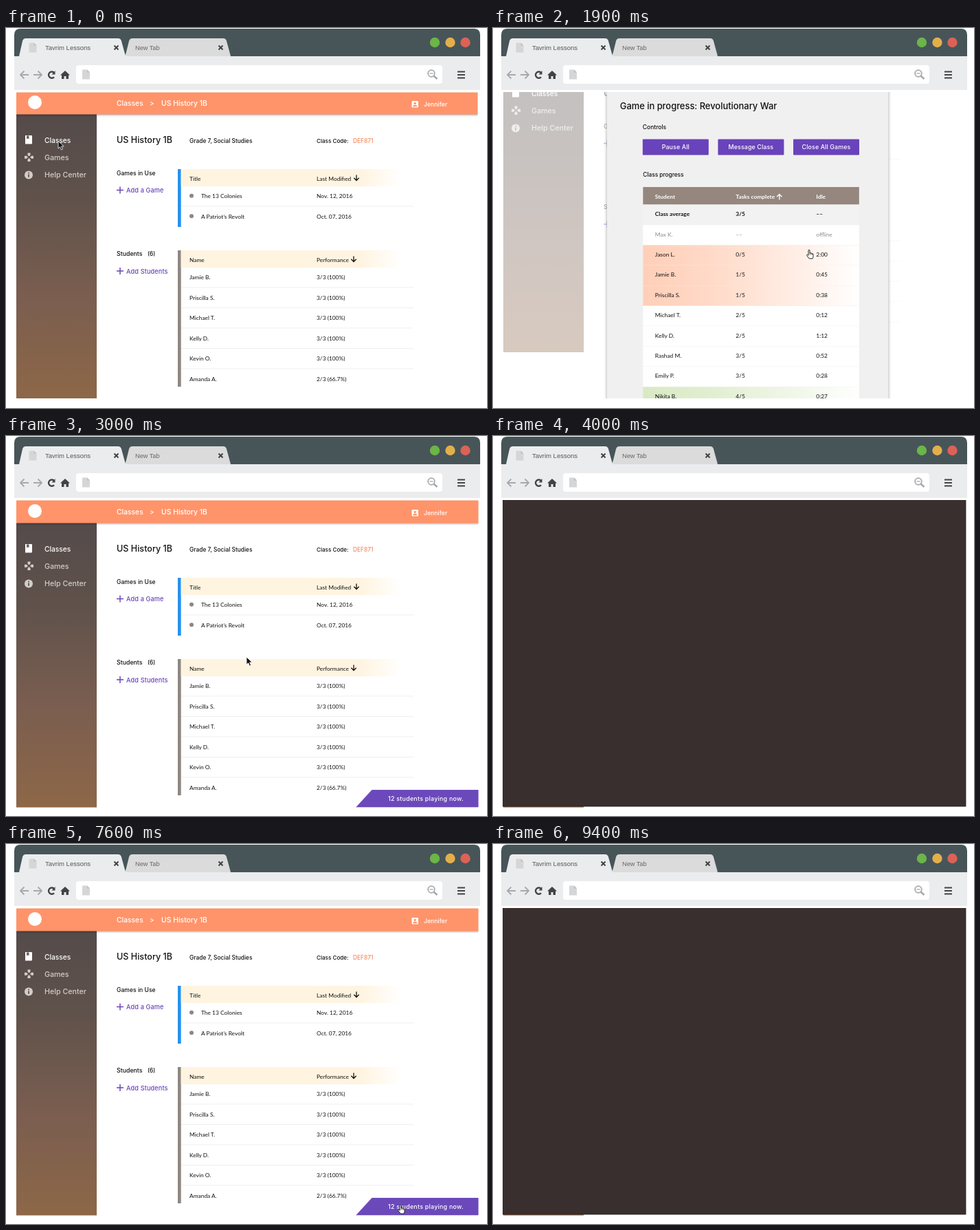
An HTML page that plays this animation: 700 by 552 pixels, repeating every 9.6 s.

```html
<!DOCTYPE html>
<html lang="en">
<head>
<meta charset="utf-8">
<title>Class dashboard</title>
<style>
  html, body { margin: 0; width: 100%; height: 100%; overflow: hidden; background: #fff; }
  svg { display: block; width: 700px; height: 552px; }
  text { white-space: pre; }
  .ui { font-family: Inter, sans-serif; font-weight: 500; }
  .cell { font-family: Lato, sans-serif; }
  .body { font-family: Roboto, sans-serif; }
  .tab { font-family: "Liberation Sans", Arial, sans-serif; }
  .shadow { filter: drop-shadow(0 2px 4px rgba(0, 0, 0, .4)); }
</style>
</head>
<body>
<svg id="stage" viewBox="0 0 700 552"></svg>
<script>
const PURPLE = '#6a45b8', INK = '#111', TAUPE = '#8f8681', ORANGE = '#ff946a';

// Markup helpers. Text is placed by the vertical centre of its capitals.
const text = (x, cy, str, size, o = {}) =>
  `<text class="${o.cls || 'ui'}" x="${x}" y="${cy + size * .36}" font-size="${size}" fill="${o.fill || INK}"` +
  ` font-weight="${o.weight || ''}" text-anchor="${o.anchor || 'start'}" letter-spacing="${o.gap || 0}">${str}</text>`;
const cell = (x, cy, str, o = {}) => text(x, cy, str, 8.4, { cls: 'cell', ...o });
const rect = (x, y, w, h, fill, extra = '') =>
  `<rect x="${x}" y="${y}" width="${w}" height="${h}" fill="${fill}" ${extra}/>`;
const path = (d, fill, extra = '') => `<path d="${d}" fill="${fill}" ${extra}/>`;
const line = (d, color, w, extra = '') => path(d, 'none', `stroke="${color}" stroke-width="${w}" ${extra}`);
const disc = (x, y, r, fill) => `<circle cx="${x}" cy="${y}" r="${r}" fill="${fill}"/>`;
const group = (id, inner, extra = '') => `<g id="${id}" ${extra}>${inner}</g>`;
const gradient = (id, stops, vertical) =>
  `<linearGradient id="${id}" x2="${vertical ? 0 : 1}" y2="${vertical ? 1 : 0}">` +
  stops.map(([at, color, a = 1]) => `<stop offset="${at}" stop-color="${color}" stop-opacity="${a}"/>`).join('') +
  '</linearGradient>';

const cross = (x, y, r, color, w) =>
  line(`M${x - r} ${y - r}l${2 * r} ${2 * r}m0 ${-2 * r}l${-2 * r} ${2 * r}`, color, w);
const plus = (x, y) => line(`M${x - 5} ${y}h10M${x} ${y - 5}v10`, PURPLE, 1.5);
const sortArrow = (x, y, dir, color) =>
  line(`M${x} ${y - 4 * dir}v${8 * dir}m-3.7 ${-3.7 * dir}l3.7 ${3.7 * dir}l3.7 ${-3.7 * dir}`, color, 1.3);
const sheet = (x, y) =>
  path(`M${x} ${y}h7l4 4v10h-11z`, '#d6d6d7') + path(`M${x + 7} ${y}v4h4z`, '#bfbfc1');

const defs = '<defs>' +
  gradient('side', [[0, '#544b4a'], [.3, '#60524b'], [.65, '#7b5e50'], [1, '#8d6747']], true) +
  gradient('cream', [[0, '#fff4e0'], [.82, '#fff4e0'], [1, '#fff4e0', 0]]) +
  gradient('late', [[0, '#ffcfb8'], [.3, '#ffd9c7'], [.75, '#fff0e8'], [1, '#fff']]) +
  gradient('ahead', [[0, '#d9e9c4'], [.3, '#e1eed0'], [.75, '#f3f8ec'], [1, '#fff']]) +
  '<clipPath id="view"><rect id="viewBox" x="15" y="93.5"/></clipPath></defs>';

function browser() {
  const dark = '#434244', grey = '#a9a9ab';
  return path('M12 41V10q0-9 9-9h660q9 0 9 9v31z', '#475559') +
    rect(12, 41, 678, 49, '#ebecee') +
    path('M171 41q3-1 4-6l4-16q1-4 5-4h132q4 0 5 4l6 22z', '#dbdbdb') +
    path('M19 41l5-22q1-4 5-4h134q4 0 5 4l6 22z', '#ebecee') +
    sheet(33.5, 21.5) + sheet(111, 60.5).replace('', '') +
    text(57, 28.5, 'Tavrim Lessons', 9.5, { cls: 'tab', fill: '#555' }) +
    text(188, 28.5, 'New Tab', 9.2, { cls: 'tab', fill: '#666' }) +
    cross(160.5, 28.5, 3, '#3f4446', 2) + cross(312.5, 28.5, 3, '#3f4446', 2) +
    disc(624, 21, 7.2, '#6cb548') + disc(646.5, 21, 7.2, '#e3af4c') + disc(668.5, 21, 7.2, '#dc6257') +
    line('M33 68H21m5.5-5.5L21 68l5.5 5.5M40 68h12m-5.5-5.5L52 68l-5.500 5.500', grey, 1.8) +
    line('M70 65a4.600 4.600 0 1 0 0 6.200', dark, 2.4) + path('M71.500 62v5.500h-5z', dark) +
    path('M79 68.500l7-6.500 7 6.500h-2v5.500h-3.500v-4h-3v4H81v-5.500z', dark) +
    rect(102, 54, 533, 27, '#fff', 'rx="4"') + sheet(111, 60.5) +
    `<circle cx="619" cy="66" r="4.800" fill="none" stroke="${grey}" stroke-width="1.800"/>` +
    line('M616.500 66h5', grey, 1.3) + line('M622.500 69.500l5 4.500', grey, 2.8) +
    line('M657 63.500h11m-11 4.500h11m-11 4.500h11', dark, 2.2);
}

function frame() {
  const pale = '#d3cdca';
  return rect(15, 126, 117, 414, 'url(#side)') +
    rect(15, 93, 673, 33.5, ORANGE, 'style="filter:drop-shadow(0 1px 1.5px rgba(0,0,0,.35))"') +
    disc(42, 109, 10, '#fff') +
    text(161, 110.5, 'Classes', 10.3, { fill: '#fff' }) +
    text(209, 110.5, '&gt;', 10, { fill: '#fff' }) +
    text(226, 110.5, 'US History 1B', 10.4, { fill: '#fff' }) +
    rect(590.5, 107, 9.5, 9.5, '#fff', 'rx="1"') + disc(595.2, 110.4, 1.7, ORANGE) +
    path('M592 115.300q0-2.600 3.200-2.600t3.200 2.600z', ORANGE) +
    text(608, 112.3, 'Jennifer', 8.7, { fill: '#fff' }) +
    path('M28 157h9q1 0 1 1v10.500q0 1-1 1h-9z', '#fff') + path('M30 157.500h3.500v5l-1.750-1.300-1.750 1.300z', '#6b605d') +
    text(56, 164, 'Classes', 10.2, { fill: '#fff' }) +
    path('M31.500 182.500h4v3l-2 2-2-2zM31.500 195h4v-3l-2-2-2 2zM27 186.800v4h3l2-2-2-2zM40 186.800v4h-3l-2-2 2-2z', pale) +
    text(56, 189.3, 'Games', 10.7, { fill: pale }) +
    disc(33, 214.5, 6, pale) + rect(32.2, 213.5, 1.7, 4.3, '#584e4b') + rect(32.2, 210.7, 1.7, 1.7, '#584e4b') +
    text(56, 214.5, 'Help Center', 10.7, { fill: pale });
}

function table(y, h, bar, heads, rows) {
  let out = rect(250, y, 4.7, h, bar) + rect(254.7, y, 320, 25, 'url(#cream)') +
    cell(267, y + 13.5, heads[0]) + cell(452, y + 13.5, heads[1]) + sortArrow(heads[2], y + 12.5, 1, INK);
  rows.forEach(([name, value, indent = 0], i) => {
    const cy = y + 39 + i * 29.5;
    if (indent) out += disc(270, cy - .3, 3, TAUPE);
    out += cell(267 + indent, cy, name) + cell(452, cy, value);
    if (i < rows.length - 1) out += rect(255, cy + 14.5, 338, .8, '#ececec');
  });
  return out;
}

function content() {
  const link = { fill: PURPLE, gap: .1 };
  const pupils = ['Jamie B.', 'Priscilla S.', 'Michael T.', 'Kelly D.', 'Kevin O.', 'Amanda A.'];
  return text(161, 163.7, 'US History 1B', 12.6) +
    text(267, 164.7, 'Grade 7, Social Studies', 8.4) +
    text(452, 165, 'Class Code:', 8.1) +
    text(505, 165, 'DEF871', 8.4, { fill: '#f58a5c', weight: 600 }) +
    text(161, 211.5, 'Games in Use', 8.6) + plus(166, 236.5) + text(175, 236.7, 'Add a Game', 9.2, link) +
    text(161, 329, 'Students', 8.8) + text(206, 329, '(6)', 8.4) + plus(166, 354) +
    text(175, 354.2, 'Add Students', 9.2, link) +
    table(206, 84, '#2492ee', ['Title', 'Last Modified', 510],
      [['The 13 Colonies', 'Nov. 12, 2016', 17], ['A Patriot’s Revolt', 'Oct. 07, 2016', 17]]) +
    table(324, 198, TAUPE, ['Name', 'Performance', 506],
      pupils.map((p, i) => [p, i < 5 ? '3/3 (100%)' : '2/3 (66.7%)']));
}

const banner = () => path('M509 539.500L532.500 514H688v25.500z', '#6c49bb') +
  text(556, 526.5, '12 students playing now.', 8.9, { fill: '#fff', gap: .25 });

const dialog = () => rect(244, 232, 276, 105, '#fff', 'class="shadow"') +
  text(256.5, 250, 'Watch live game progress?', 8.5) +
  text(256.5, 272, 'Students in US History 1B have opened a game. See their average', 8.5, { cls: 'body', fill: '#808080' }) +
  text(256.5, 284.5, 'progress and find out who is ahead or behind.', 8.5, { cls: 'body', fill: '#808080' }) +
  text(417, 315, 'Ignore', 9, { fill: PURPLE, anchor: 'middle', gap: .1 }) +
  rect(451.5, 305.5, 56, 19, PURPLE) + text(479, 315, 'Watch', 9, { fill: '#fff', anchor: 'middle' });

function modal() {
  const white = { fill: '#fff', weight: 700 }, bold = { weight: 700 };
  const rows = [
    ['Max K.', '––', 'offline'], ['Jason L.', '0/5', '2:00', 'late'], ['Jamie B.', '1/5', '0:45', 'late'],
    ['Priscilla S.', '1/5', '0:38', 'late'], ['Michael T.', '2/5', '0:12'], ['Kelly D.', '2/5', '1:12'],
    ['Rashad M.', '3/5', '0:52'], ['Emily P.', '3/5', '0:28'], ['Nikita B.', '4/5', '0:27', 'ahead'],
    ['Kevin O.', '4/5', '0:15', 'ahead'], ['Amanda A.', '5/5', '0:08', 'ahead']];
  const cells = (cy, r, o) => r.slice(0, 3).map((s, i) => cell([216, 333.5, 450.5][i], cy, s, o)).join('');
  let out = rect(146, 121, 409.5, 600, '#f1f0f0', 'style="filter:drop-shadow(0 1px 2px rgba(0,0,0,.4))"') +
    rect(146, 121, 409.5, 25, '#584d4b') +
    text(349.7, 133.7, 'Live Game Data', 10.4, { fill: '#fff', anchor: 'middle', gap: .55 }) +
    cross(539.5, 133.5, 5.5, '#fff', 2) +
    text(165, 167, 'Game in progress: Revolutionary War', 12.9) +
    text(198, 197.3, 'Controls', 8.5) + text(198.5, 267, 'Class progress', 8.3);
  ['Pause All', 'Message Class', 'Close All Games'].forEach((s, i) => {
    const x = 198 + i * 109.6;
    out += rect(x, 215, 96, 23, '#6943bb', 'rx="1"') +
      text(x + 48, 226.5, s, 8.8, { fill: '#fff', anchor: 'middle', gap: .15 });
  });
  out += rect(198.5, 284.5, 314.5, 25.5, '#95877e') + cells(298, ['Student', 'Tasks complete', 'Idle'], white) +
    sortArrow(397, 299, -1, '#fff') +
    rect(198.5, 310, 314.5, 30, '#f2f2f2') + cells(323.7, ['Class average', '3/5', '––'], bold);
  rows.forEach((r, i) => {
    const y = 339.7 + i * 29.4;
    out += rect(198.5, y, 314.5, 29.5, r[3] ? `url(#${r[3]})` : '#fff') +
      rect(198.5, y + 29, 314.5, .7, '#f0eeec') + cells(y + 13.4, r, i ? {} : { fill: '#8a8a8a' });
  });
  return out;
}

const arrow = path('M0 0v11l2.600-2.300 1.900 4.200 2-.9-1.900-4.100h3.600z', '#111', 'stroke="#fff" stroke-width=".8"');
const hand = path('M3 6.500V1.500q0-1.300 1-1.300t1 1.300v3.300q1.200-.8 1.800.4 1.300-.6 1.700.6 1.500-.3 1.500 1.200v2.800q0 1.200-1 3.200H4.300' +
  'L.8 8.700q-.6-1.200.5-1.500.8 0 1.700 1.200z', '#fff', 'stroke="#222" stroke-width="1"') +
  line('M5 5v2.500M6.800 5.300v2.200M8.500 6v1.600', '#222', .7);

document.getElementById('stage').innerHTML = defs + browser() +
  group('screen',
    group('page', frame() + group('content', content()) + group('banner', banner())) +
    group('dialog', dialog()) + group('modal', modal()) +
    group('arrow', arrow) + group('hand', hand), 'clip-path="url(#view)"') +
  group('dark', rect(14.5, 93.5, 673.5, 444.5, '#392f2e', 'stroke="#241d1c" stroke-width=".8"'));

// Each step holds until the next one. The narrow view is 1px smaller and set 1px higher.
const base = { page: 1, content: 1, dialog: 0, modal: 0, banner: 0, dark: 0, narrow: 0, scroll: 0 };
const early = { narrow: 1, dialog: 0 };
const open = { narrow: 1, page: .35, modal: 1 };
const live = { banner: 1 };
const steps = [
  [0, early, 'arrow', 76, 164],
  [500, { ...early, dialog: .82 }, 'arrow', 474, 303],
  [600, { ...early, dialog: 1 }, 'arrow', 474, 303],
  [1100, { ...early, dialog: 1 }, 'hand', 456, 322],
  [1300, { ...open, page: .65, modal: .5, dialog: .4 }, 'hand', 456, 322],
  [1400, open, 'hand', 456, 322],
  [1900, { ...open, scroll: 68 }, 'hand', 456, 322],
  [2100, { ...open, scroll: 165 }, 'hand', 456, 322],
  [2300, open, 'hand', 556, 148],
  [2800, { ...live, page: .55, modal: .67 }, 'arrow', 350, 321],
  [2900, { ...live, page: .8, modal: .33 }, 'arrow', 350, 321],
  [3000, live, 'arrow', 350, 321],
  [4000, { dark: 1 }],
  [4200, {}, 'arrow', 312, 302],
  [5200, { dialog: .82 }, 'arrow', 312, 302],
  [5300, { dialog: 1 }, 'arrow', 312, 302],
  [6300, { dialog: 1 }, 'hand', 413, 315],
  [6500, { dialog: .4, banner: .6 }, 'arrow', 350, 321],
  [6600, live, 'arrow', 350, 321],
  [7600, live, 'hand', 570, 524],
  [7800, { ...live, modal: .33, content: .7 }, 'hand', 570, 524],
  [7900, { ...live, modal: .67, content: .4 }, 'hand', 570, 524],
  [8000, { ...live, modal: 1, content: .12 }, 'arrow', 567, 505],
  [8500, { ...live, modal: 1, content: .12 }, 'hand', 536, 133],
  [8700, { ...live, modal: .67, content: .4 }, 'arrow', 540, 134],
  [8800, { ...live, modal: .33, content: .7 }, 'arrow', 540, 134],
  [8900, live, 'arrow', 540, 134],
  [9400, { dark: 1 }]
];

const el = id => document.getElementById(id);
const move = (id, x, y) => el(id).setAttribute('transform', `translate(${x} ${y})`);
let shown;

function show(step) {
  const [, change, cursor, cx, cy] = step, s = { ...base, ...change };
  for (const id of ['page', 'content', 'dialog', 'modal', 'banner', 'dark']) {
    el(id).style.opacity = s[id];
    el(id).style.display = s[id] ? '' : 'none';
  }
  for (const id of ['arrow', 'hand']) {
    el(id).style.display = id === cursor ? '' : 'none';
    if (id === cursor) move(id, cx, cy);
  }
  el('viewBox').setAttribute('width', 672.5 - s.narrow);
  el('viewBox').setAttribute('height', 446 - s.narrow * 1.5);
  move('page', 0, -s.narrow - s.scroll);
  move('dialog', 0, -s.narrow);
  move('modal', s.narrow * 19.8, s.narrow * 14.5 - s.scroll);
}

const start = performance.now();
function tick() {
  const t = (performance.now() - start) % 9600;
  const step = steps.findLast(([at]) => at <= t);
  if (step !== shown) show(shown = step);
  requestAnimationFrame(tick);
}
tick();
</script>
</body>
</html>
```
